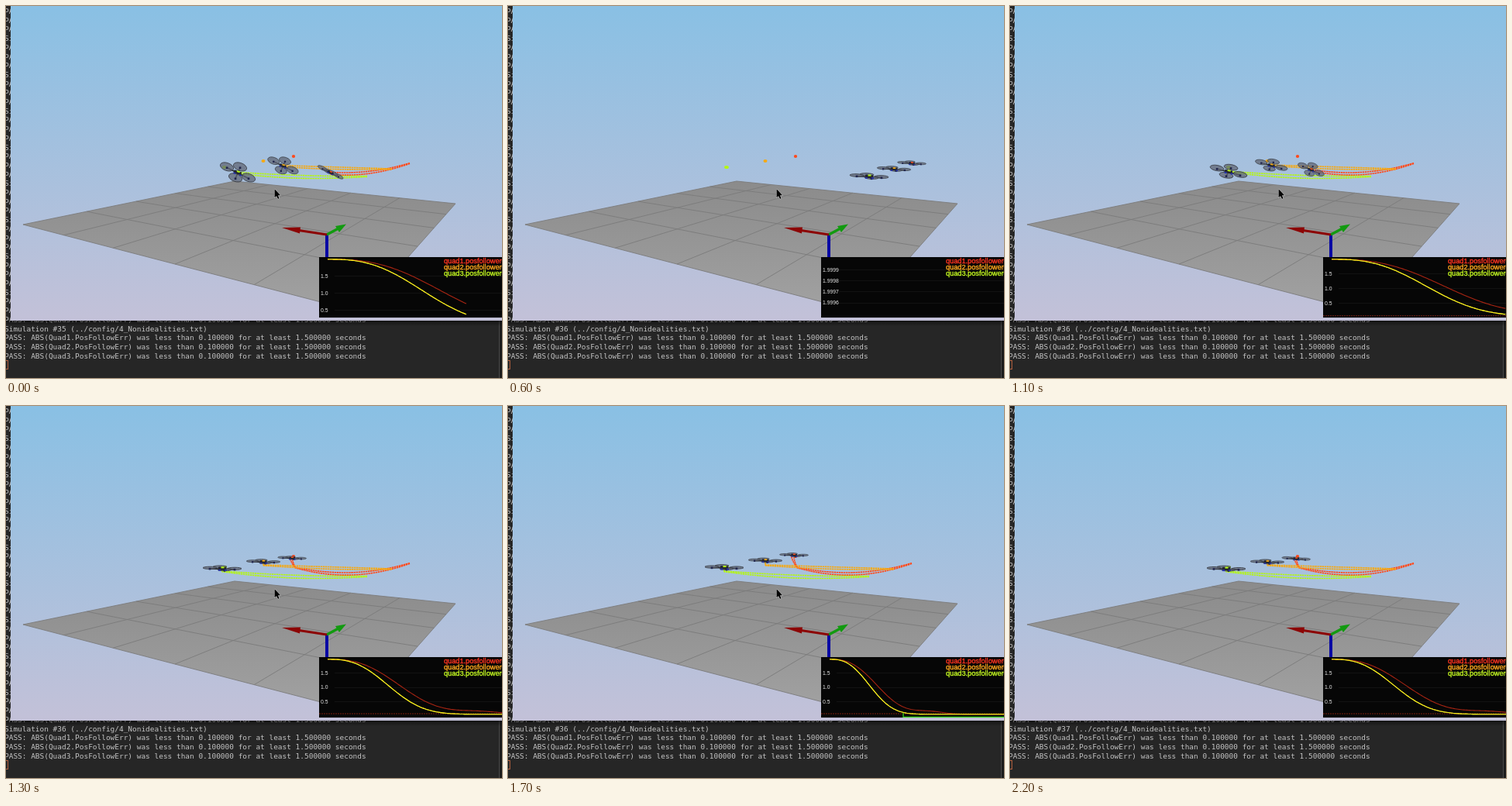
An HTML page with a canvas for the animation above (2.3 s loop, 640 by 480 pixels).

```html
<!DOCTYPE html>
<html lang="en">
<head>
<meta charset="utf-8">
<title>Quad simulation</title>
<style>
html, body { margin: 0; width: 100%; height: 100%; overflow: hidden; background: #262626; }
canvas { display: block; }
</style>
</head>
<body>
<canvas id="stage" width="640" height="480"></canvas>
<script>
const c = document.getElementById('stage').getContext('2d');
const STEP = 100, STEPS = 23;

// Simulation runs: number, then [step, simulated time] keys.
const runs = [
  [35, [[0, 1.42], [3, 2.85], [5, 3.9]]],
  [36, [[6, 0], [7, .02], [8, .25], [13, 2.8], [17, 4.25]]],
  [37, [[18, .1], [19, .55], [20, 1.19], [22, 2.72]]]
];

// Attitude keys: time, long arm x/y, short arm x/y, rotor angle, rotor half height.
const poses = [
  [0, 16, 1, 3, 2, 2, 1.8], [.2, 15, -10, 5, -2, -33, 1.6], [.65, 16, -4, 4, 3, -12, 2.5],
  [1, 17, 1, -3, 2, 3, 2], [1.19, 14, 7, 4, 1.5, 27, 3], [1.42, 14, 7, 3, -7, 20, 5],
  [1.8, 15, 4, 3, -5, 10, 3.5], [2.4, 16, .5, 3, 1.8, 0, 1.6]
];

const quads = [
  { color: '#ff4a1c', lag: 1.19, size: .74, goal: [371, 194], x: 369, span: 152, pow: 1,
    rise: 15, gap: 2.4, y: (x, p) => 215 - (x - 437) ** 2 / 570 },
  { color: '#f5a914', lag: 1, size: .87, goal: [332, 200], x: 332, span: 166, pow: 1.05,
    rise: 6, gap: 2, y: (x, p) => 205 + 5 * p },
  { color: '#b4f614', lag: 1, size: 1, goal: [282, 208], x: 279, span: 187, pow: 1.25,
    rise: 5, gap: 3, y: (x, p) => 213 + 14.5 * p - 8 * p * p }
];

function sample(keys, t) {
  let i = 0;
  while (i < keys.length - 2 && t > keys[i + 1][0]) i++;
  const a = keys[i], b = keys[i + 1];
  const f = Math.min(1, Math.max(0, (t - a[0]) / (b[0] - a[0])));
  return a.map((v, j) => v + (b[j] - v) * f);
}

const decay = (q, s) => 2 ** -((s / q.lag) ** 2.7);
const error = (q, s) => .08 + 1.92 * decay(q, s)
  + (q.lag > 1 ? .1 * Math.exp(-(((s - 2.4) / .5) ** 2)) : 0);

function place(q, s) {
  const p = decay(q, s) ** q.pow, x = q.x + q.span * p;
  const climb = q.rise * (1 - Math.exp(-2.2 * Math.max(0, s - 2.2)));
  return { x, y: q.y(x, p) - climb, p, climb };
}

function path(points, close) {
  c.beginPath();
  points.forEach(([x, y]) => c.lineTo(x, y));
  if (close) c.closePath();
}
function line(points, color, width) {
  path(points);
  c.strokeStyle = color;
  c.lineWidth = width;
  c.stroke();
}
function shape(points, fill) {
  path(points, true);
  c.fillStyle = fill;
  c.fill();
}
function box(x, y, w, h, fill) {
  c.fillStyle = fill;
  c.fillRect(x, y, w, h);
}
function fade(y0, y1, top, bottom) {
  const g = c.createLinearGradient(0, y0, 0, y1);
  g.addColorStop(0, top);
  g.addColorStop(1, bottom);
  return g;
}
function dot(x, y, rx, ry, color) {
  c.beginPath();
  c.ellipse(x, y, rx, ry, 0, 0, 7);
  c.fillStyle = color;
  c.fill();
}

function terminal(run) {
  box(0, 0, 640, 480, '#262626');
  c.font = '9.46px "DejaVu Sans Mono", monospace';
  c.fillStyle = '#c4c4c4';
  for (let i = 0; i < 40; i++) {
    const text = i % 4 == 3
      ? `Simulation #${run} (../config/4_Nonidealities.txt)`
      : `PASS: ABS(Quad${3 - i % 4}.PosFollowErr) was less than 0.100000 for at least 1.500000 seconds`;
    c.fillText(text, -2, 454.6 - 11.7 * i);
  }
  c.strokeStyle = '#b5613f';
  c.lineWidth = 1;
  c.strokeRect(-2.5, 457.5, 5, 11);
  box(636, 406, 1, 74, '#4a4a4a');
  box(637, 406, 3, 74, '#1b1b1b');
  box(0, 406, 640, 7, fade(406, 413, 'rgba(0,0,0,.5)', 'rgba(0,0,0,0)'));
}

// Floor corners: left, back, right, front; mapped from the unit square.
const corners = [[22, 282], [295, 226], [580, 255], [456, 395]];
const onFloor = (() => {
  const [[x0, y0], [x1, y1], [x2, y2], [x3, y3]] = corners;
  const ax = x1 - x2, ay = y1 - y2, bx = x3 - x2, by = y3 - y2;
  const sx = x0 - x1 + x2 - x3, sy = y0 - y1 + y2 - y3, d = ax * by - bx * ay;
  const g = (sx * by - bx * sy) / d, h = (ax * sy - sx * ay) / d;
  return (u, v) => {
    const w = 1 + g * u + h * v;
    return [(x0 + (x1 - x0 + g * x1) * u + (x3 - x0 + h * x3) * v) / w,
            (y0 + (y1 - y0 + g * y1) * u + (y3 - y0 + h * y3) * v) / w];
  };
})();

function scene() {
  box(6, 0, 634, 406, fade(0, 406, '#89c0e4', '#c3c1d8'));
  shape(corners, fade(226, 395, '#8b8b8b', '#a2a2a2'));
  for (let i = 0; i <= 5; i++) {
    const k = i / 5;
    line([onFloor(k, 0), onFloor(k, 1)], '#7b7b7b', .9);
    line([onFloor(0, k), onFloor(1, k)], '#7b7b7b', .9);
  }
  line([[414, 294], [414, 326]], '#0808a4', 4);
  line([[414, 295], [428, 287.5]], '#129a10', 3.5);
  shape([[439, 281.5], [425, 284], [430, 292]], '#129a10');
  line([[414, 295], [378, 289.5]], '#8c0505', 3);
  shape([[356, 286], [380, 285.5], [379, 293.5]], '#8c0505');
}

function trail(q, now) {
  const main = [], side = [];
  for (let i = 0; i <= 100; i++) {
    const { x, y, p, climb } = place(q, now * i / 100);
    main.push([x, y]);
    side.push([x - (q.lag > 1 ? climb / 4 : 0), y + q.gap * Math.sin(Math.PI * p) + .8]);
  }
  c.setLineDash([2.5, .6]);
  line(main, q.color, 1.6);
  line(side, q.color, 1.6);
  c.setLineDash([]);
}

function drone(q, s) {
  const { x, y } = place(q, s);
  const [, ax, ay, bx, by, angle, ry] = sample(poses, s / q.lag);
  const hubs = [[-bx, -by], [-ax, -ay], [ax, ay], [bx, by]];
  c.save();
  c.translate(x, y);
  c.scale(q.size, q.size);
  for (const [hx, hy] of hubs) {
    line([[0, 1], [hx, hy + 1]], '#24262c', 1.6);
    c.beginPath();
    c.ellipse(hx, hy, 9, ry, angle * Math.PI / 180, 0, 7);
    c.fillStyle = 'rgba(96,102,116,.75)';
    c.fill();
    c.strokeStyle = '#3c4048';
    c.lineWidth = .9;
    c.stroke();
    box(hx - 1.3, hy, 2.6, 2.6, '#20244c');
  }
  c.rotate(angle * Math.PI / 180);
  box(-5, -1.5, 10, 4, '#23262e');
  box(-5, 1.5, 3, 2, '#2632a8');
  box(3, 1.5, 3, 2, '#2632a8');
  box(-1.5, -2, 4, 2, q.color);
  c.restore();
}

function pointer() {
  path([[346.5, 236], [346.5, 247.3], [349, 245.2], [351, 249], [352.6, 248.2],
        [351, 244.6], [354.2, 244.2]], true);
  c.strokeStyle = '#e8e8e8';
  c.lineWidth = 1;
  c.stroke();
  c.fillStyle = '#050505';
  c.fill();
}

function tickSize(range) {
  for (let e = -5; ; e++)
    for (const m of [1, 2, 5])
      if (range / (m * 10 ** e) <= 6) return [m * 10 ** e, Math.max(0, -e)];
}

function graph(s) {
  c.save();
  c.beginPath();
  c.rect(404, 324, 236, 78);
  c.clip();
  box(404, 324, 236, 78, '#060606');
  const range = Math.max(.0005, 2 - error(quads[2], s));
  const toY = v => 326.8 + (2 - v) * 71 / range;
  const unit = Math.min(126, 225 / s);
  const [tick, digits] = tickSize(range);
  c.font = '6.8px "Liberation Sans", Arial, sans-serif';
  for (let v = 2 - tick; v > .01 && toY(v) < 397; v -= tick) {
    box(424, Math.round(toY(v)) - 1, 216, 1, '#121212');
    c.fillStyle = '#e6e6e6';
    c.fillText(v.toFixed(digits), 406, toY(v) + 1.5);
  }
  if (toY(.1) < 402) {
    c.setLineDash([2, 1]);
    line([[404, toY(.1)], [640, toY(.1)]], '#7a2012', 1);
    c.setLineDash([]);
  }
  ['#a82412', '#d8981c', '#f0f41c'].forEach((color, n) => {
    const points = [];
    for (let i = 0; i <= 120; i++) {
      const t = s * i / 120;
      points.push([415 + t * unit, toY(error(quads[n], t))]);
    }
    line(points, color, 1.1);
  });
  if (s > 4) line([[640, 401.5], [510, 401.5], [510, 396]], '#35d51c', 1.3);
  c.font = '9.2px "Liberation Sans", Arial, sans-serif';
  c.lineWidth = .35;
  ['#ff3420', '#ffa81e', '#c4fa20'].forEach((color, n) => {
    const label = [`quad${n + 1}.posfollowererr`, 565, 332 + 8 * n];
    c.fillStyle = c.strokeStyle = color;
    c.fillText(...label);
    c.strokeText(...label);
  });
  c.restore();
}

function draw(step) {
  const [run, keys] = runs.filter(r => r[1][0][0] <= step).pop();
  const s = sample(keys, step)[1];
  terminal(run);
  scene();
  for (const q of quads) {
    dot(...q.goal, q.size * 2.9, 2, q.color);
    if (s > .4) trail(q, s);
  }
  for (const q of quads) drone(q, s);
  if (step < STEPS - 1) pointer();
  graph(s);
}

let start;
function tick(now) {
  start ??= now;
  draw(Math.floor((now - start) / STEP) % STEPS);
  requestAnimationFrame(tick);
}
draw(0);
requestAnimationFrame(tick);
</script>
</body>
</html>
```
